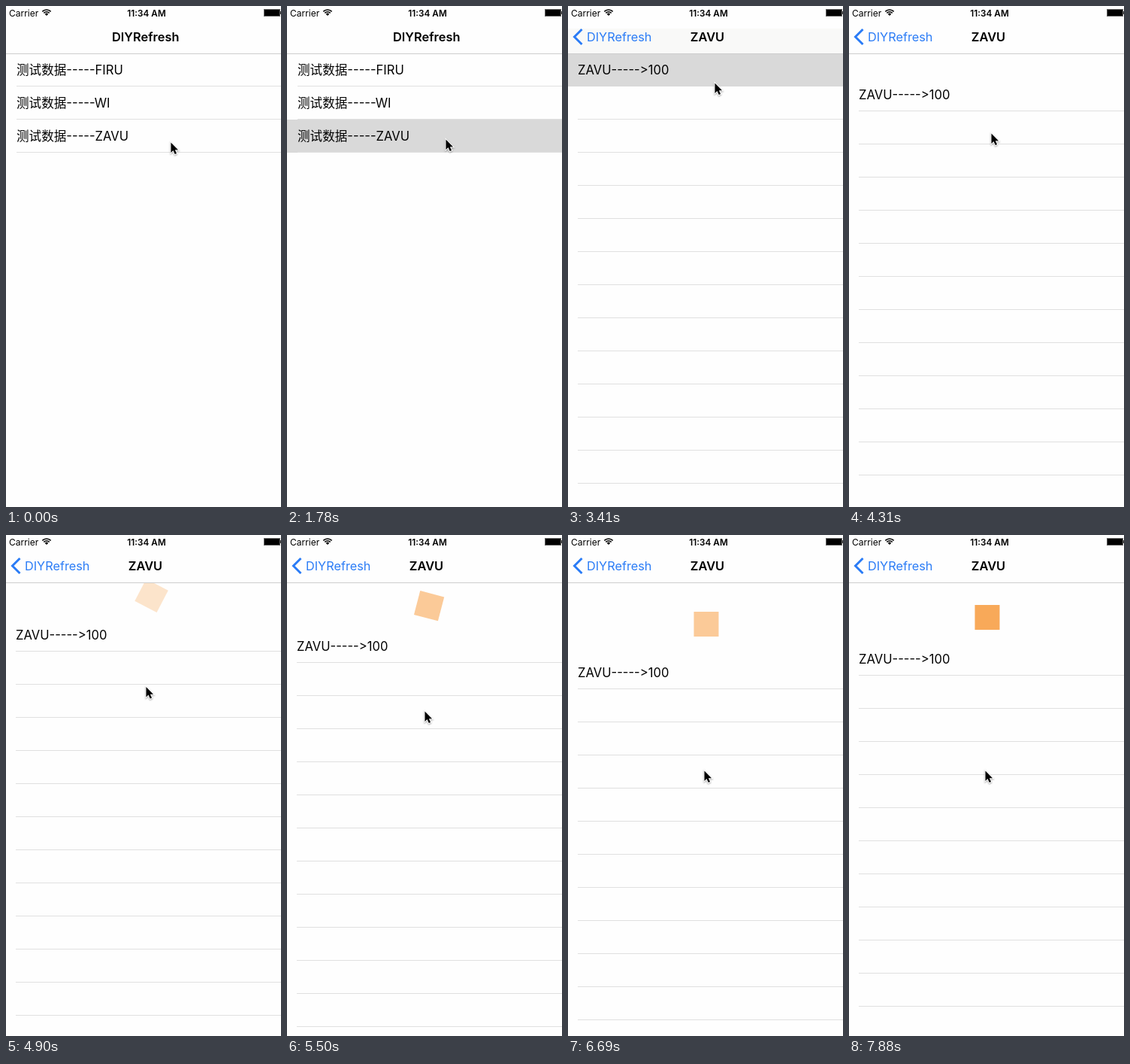
Recreate the animation shown at these times as an HTML page with a canvas. Size 366 by 666 pixels, loop 8 s.

```html
<!DOCTYPE html>
<html lang="zh">
<head>
<meta charset="utf-8">
<title>DIYRefresh</title>
<style>
html, body { margin: 0; width: 366px; height: 666px; overflow: hidden; background: #fefefe; }
canvas { display: block; }
</style>
</head>
<body>
<canvas id="stage" width="366" height="666"></canvas>
<script>
const W = 366, H = 666, LOOP = 8000, STEP = 148.6;
const NAV = 64, ROW = 44;
const PAPER = '#fefefe', RULE = '#e0e0e0', PICKED = '#d9d9d9', BLUE = '#2b7cf6', ORANGE = '#f78b1c';
const FAMILY = 'Inter, "Noto Sans CJK SC", "Noto Sans CJK", "Noto Sans", sans-serif';
const BRANDS = ['FIRU', 'WI', 'ZAVU'];
const PAGE = BRANDS[2];

// Keys are [step, ...values]
const CURSOR = [
  [1, 219, 181], [4, 211, 177], [15, 211, 177], [19, 198, 112], [21, 196, 97], [22, 196, 97],
  [23, 195, 102], [29, 189, 169], [37, 183, 234], [45, 181, 313]
];
const PULL = [[23, 0], [29, 33], [37, 63], [45, 98], [46, 98], [47, 86], [48, 80]];

const c = document.getElementById('stage').getContext('2d');
const clamp = v => Math.max(0, Math.min(1, v));

function at(keys, k) {
  const i = keys.findIndex(key => key[0] >= k);
  if (i < 0) return keys[keys.length - 1].slice(1);
  if (i === 0) return keys[0].slice(1);
  const a = keys[i - 1], b = keys[i], f = (k - a[0]) / (b[0] - a[0]);
  return a.slice(1).map((v, j) => v + (b[j + 1] - v) * f);
}

function rect(x, y, w, h, color) {
  c.fillStyle = color;
  c.fillRect(x, y, w, h);
}

// Returns the x where the text ends
function text(str, x, y, { size = 16.6, weight = 400, color = '#000', align = 'left', alpha = 1 } = {}) {
  c.globalAlpha = alpha;
  c.font = `${weight} ${size}px ${FAMILY}`;
  c.textAlign = align;
  c.fillStyle = color;
  c.fillText(str, x, y);
  c.globalAlpha = 1;
  return x + c.measureText(str).width;
}

function rootList(x, picked, dim) {
  rect(0, NAV, W, H - NAV, PAPER);
  if (picked) rect(0, NAV + 2 * ROW - 1, W, ROW, PICKED);
  BRANDS.forEach((name, i) => {
    const y = NAV + i * ROW;
    text('测试数据-----' + name, x + 14, y + 27);
    rect(x + 14, y + 42, W - x, 1, RULE);
  });
  rect(0, NAV, W, H - NAV, `rgba(0,0,0,${0.1 * dim})`);
}

function badge(pull, k) {
  const q = clamp((pull - 40) / 40);
  if (!q) return;
  const flash = k < 47 ? 0 : Math.abs(Math.sin((k - 47) * 0.436));
  c.save();
  c.globalAlpha = 0.45 * clamp(q * 2.5) + 0.55 * flash;
  c.translate(184 + (1 - q) * 12, 69.5 + pull / 2 - (1 - q) * 16);
  c.rotate((1 - q) * 0.6);
  rect(-16.5, -16.5, 33, 33, ORANGE);
  c.restore();
}

function detailList(x, pull, picked, k) {
  rect(x - 1, NAV, 1, H - NAV, 'rgba(0,0,0,.04)');
  rect(x, NAV, W, H - NAV, PAPER);
  badge(pull, k);
  for (let y = NAV + 42 + Math.round(pull); y < H; y += ROW) rect(x + 13, y, W, 1, RULE);
  if (picked) rect(x, NAV, W, ROW - 1, PICKED);
  // Two runs, so that the font does not join the dashes into an arrow
  const y = NAV + 27 + Math.round(pull);
  text('>100', text(PAGE + '-----', x + 13, y), y);
}

function navBar(p, tinted) {
  rect(0, 0, W, NAV, PAPER);
  if (tinted) rect(0, 30, W, NAV - 30, '#f9f9f8');
  rect(0, NAV - 1, W, 1, '#cdcdcd');
  const bold = { weight: 600, size: 16.4 };
  if (p < 1) text('DIYRefresh', 141 - 116 * p, 47, { ...bold, alpha: 1 - p });
  if (!p) return;
  text('DIYRefresh', 25 + 107 * (1 - p), 47, { size: 16.3, color: BLUE, alpha: p });
  text(PAGE, 185.5 + 215 * (1 - p), 47, { ...bold, align: 'center', alpha: p });
  c.globalAlpha = clamp((p - 0.9) * 10);
  c.strokeStyle = BLUE;
  c.lineWidth = 3;
  c.beginPath();
  c.moveTo(18.5, 31);
  c.lineTo(8.5, 41);
  c.lineTo(18.5, 51);
  c.stroke();
  c.globalAlpha = 1;
}

function statusBar() {
  text('Carrier', 4, 13.5, { size: 12 });
  text('11:34 AM', 187, 13.5, { size: 11.8, weight: 600, align: 'center' });
  c.strokeStyle = '#000';
  c.lineWidth = 1.6;
  for (const r of [8, 5.2]) {
    c.beginPath();
    c.arc(54, 13, r, -Math.PI * 0.75, -Math.PI * 0.25);
    c.stroke();
  }
  c.fillStyle = '#000';
  c.beginPath();
  c.moveTo(54, 13);
  c.arc(54, 13, 3.2, -Math.PI * 0.75, -Math.PI * 0.25);
  c.fill();
  rect(343, 4, 22, 10, '#666');
  rect(344, 5, 20, 8, '#000');
  rect(365, 7, 1, 4, '#333');
}

const ARROW = new Path2D('M0 0V13.5L3 10.6L5.3 15.6L7.6 14.6L5.4 9.8H9.6Z');

function cursor([x, y]) {
  c.save();
  c.translate(x + 0.5, y + 0.5);
  c.shadowColor = 'rgba(0,0,0,.35)';
  c.shadowBlur = 2;
  c.shadowOffsetY = 1;
  c.strokeStyle = '#fff';
  c.lineWidth = 2;
  c.stroke(ARROW);
  c.shadowColor = 'transparent';
  c.fillStyle = '#000';
  c.fill(ARROW);
  c.restore();
}

function draw(ms) {
  // The motion advances in even steps, as in a screen recording
  const k = Math.floor((ms % LOOP + 10) / STEP);
  const p = k < 13 ? 0 : k > 17 ? 1 : 1 - Math.exp(-1.33 * (k - 13));
  if (p < 1) rootList(-110 * p, k >= 12, p);
  if (p > 0) detailList(Math.round(W * (1 - p)), at(PULL, k)[0], k === 23, k);
  navBar(p, k > 12 && k < 24);
  statusBar();
  cursor(at(CURSOR, k));
}

const start = performance.now();
function tick() {
  draw(performance.now() - start);
  requestAnimationFrame(tick);
}
tick();
</script>
</body>
</html>
```
